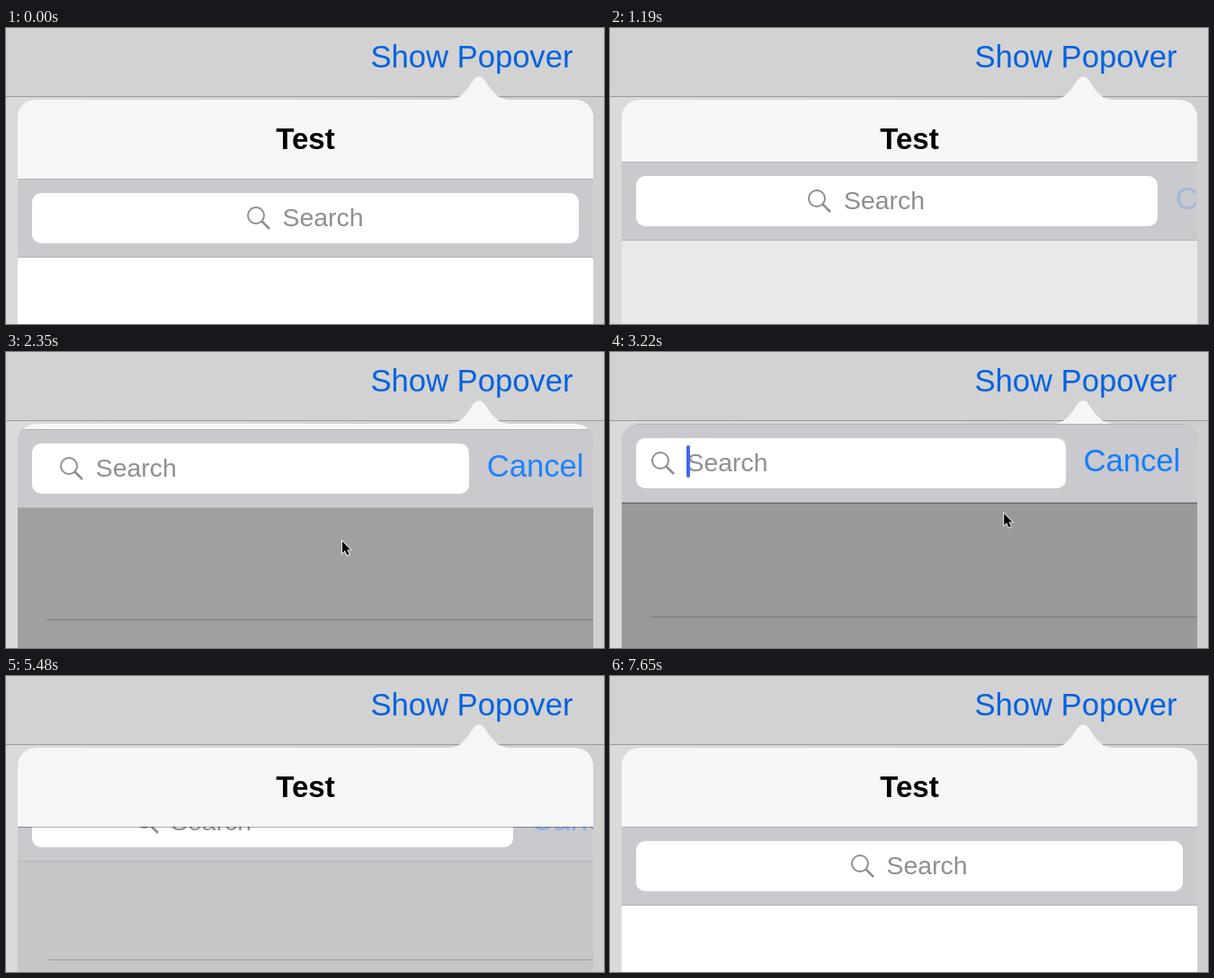
Recreate the animation shown at these times as an HTML page. Size 665 px wide and 330 px high, loop 8000 ms.

```html
<!DOCTYPE html>
<html lang="en">
<head>
<meta charset="utf-8">
<title>Search popover</title>
<style>
/* 0 = search bar at rest, 1 = search active */
@property --p { syntax: "<number>"; inherits: true; initial-value: 0; }

html, body { margin: 0; width: 100%; height: 100%; overflow: hidden; }
body {
  position: relative;
  background: linear-gradient(90deg, #dadada 13px, #cfcfcf 653px);
  font: 34.6px/40px "Liberation Sans", Arial, sans-serif;
  white-space: nowrap;
}
body, .nav, .cancel, .caret, .mouse { animation: 8s linear infinite; }
body { animation-name: search; }
body *, body > * { position: absolute; box-sizing: border-box; }
svg { overflow: visible; }

.toolbar {
  left: 0; top: 0; width: 665px; height: 77px;
  background: #d2d2d2; border-bottom: 1px solid #9b9b9b;
}
.show { left: 405.5px; top: 12px; color: #0062e0; }
.arrow { left: 0; top: 0; fill: #f6f6f6; }

.popover {
  left: 13px; top: 80px; width: 640px; height: 250px;
  overflow: hidden; border-radius: 20px 20px 0 0; background: #fff;
}
.row-line {
  left: 32px; right: 0; height: 1px; background: #c8c8cc;
  top: calc(263px - 48px * var(--p));
}
.dim { inset: 0; background: #000; opacity: calc(.4 * var(--p)); }

.nav {
  z-index: 1; left: 0; top: 0; width: 640px; height: 89px;
  background: #f6f6f6; background-clip: padding-box;
  border-bottom: 1px solid rgba(0, 0, 0, .33);
  font-weight: bold; font-size: 33px; text-align: center;
  animation-name: nav-layer;
}
.nav span { left: 0; right: 0; top: 24px; }

.bar {
  z-index: 2; left: 0; width: 640px; height: 88px;
  top: calc(88px - 88px * var(--p));
  background: #c9c9ce; box-shadow: inset 0 1px #b2b2b7, inset 0 -1px #b2b2b7;
}
.field {
  left: 16px; top: 16px; height: 56px; border-radius: 10px; background: #fff;
  width: calc(608px - 130px * var(--p));
}
.hint {
  left: calc(254px - 222px * var(--p)); top: 31px;
  color: #8e8e93; font-size: 28.4px; line-height: 26px;
}
.hint svg { left: 0; top: 0; fill: none; stroke: #8e8e93; stroke-width: 2; }
.hint span { left: 40.6px; top: -1px; }
.cancel {
  left: calc(643.5px - 130px * var(--p)); top: 21px; color: #147efb;
  animation-name: cancel;
}
.caret {
  left: 72px; top: 24px; width: 4px; height: 36px; border-radius: 2px;
  background: #4168ee; animation-name: blink;
}
.mouse { left: 0; top: 0; animation-name: mouse; }

@keyframes search {
  0% { --p: 0; }
  6% { --p: 0; animation-timing-function: cubic-bezier(.42, 0, .45, 1); }
  36% { --p: 1; }
  53% { --p: 1; animation-timing-function: cubic-bezier(.5, 0, .59, 1); }
  84%, 100% { --p: 0; }
}
@keyframes nav-layer {
  0%, 53.37% { z-index: 1; }
  53.375%, 83.995% { z-index: 3; }
  84%, 100% { z-index: 1; }
}
@keyframes cancel {
  0% { opacity: 0; }
  6% { opacity: 0; animation-timing-function: cubic-bezier(.42, 0, .45, 1); }
  36%, 53% { opacity: 1; }
  77%, 100% { opacity: 0; }
}
@keyframes blink {
  0%, 35.99% { opacity: 0; }
  36%, 47.62% { opacity: 1; }
  47.625%, 51.24% { opacity: 0; }
  51.25%, 53.37% { opacity: 1; }
  53.375%, 100% { opacity: 0; }
}
@keyframes mouse {
  0% { transform: translate(373px, 210px); }
  36.5% { transform: translate(373px, 210px); animation-timing-function: ease-in-out; }
  45.4% { transform: translate(547px, 126px); }
  87.5% { transform: translate(547px, 126px); animation-timing-function: ease-in; }
  95.6%, 100% { transform: translate(577px, 334px); }
}
</style>
</head>
<body>
  <div class="toolbar"></div>
  <div class="show">Show Popover</div>
  <svg class="arrow" width="665" height="90">
    <path d="M490 81V80C503 80 507 75 513 68L519.5 58.5Q526 50 532.5 58.5L539 68C545 75 549 80 562 80V81Z"/>
  </svg>
  <div class="popover">
    <div class="row-line"></div>
    <div class="dim"></div>
    <div class="nav"><span>Test</span></div>
    <div class="bar">
      <div class="field"></div>
      <div class="hint">
        <svg width="28" height="28"><circle cx="11" cy="10" r="9"/><path d="M17.5 16.5L26 25" stroke-width="2.6"/></svg>
        <span>Search</span>
      </div>
      <div class="caret"></div>
      <div class="cancel">Cancel</div>
    </div>
  </div>
  <svg class="mouse" width="12" height="19">
    <path d="M1 1V14L4 11.3L6.3 16.6L8.6 15.6L6.3 10.5H10.2Z" stroke="#fff" stroke-width="1.6" paint-order="stroke"/>
  </svg>
</body>
</html>
```
